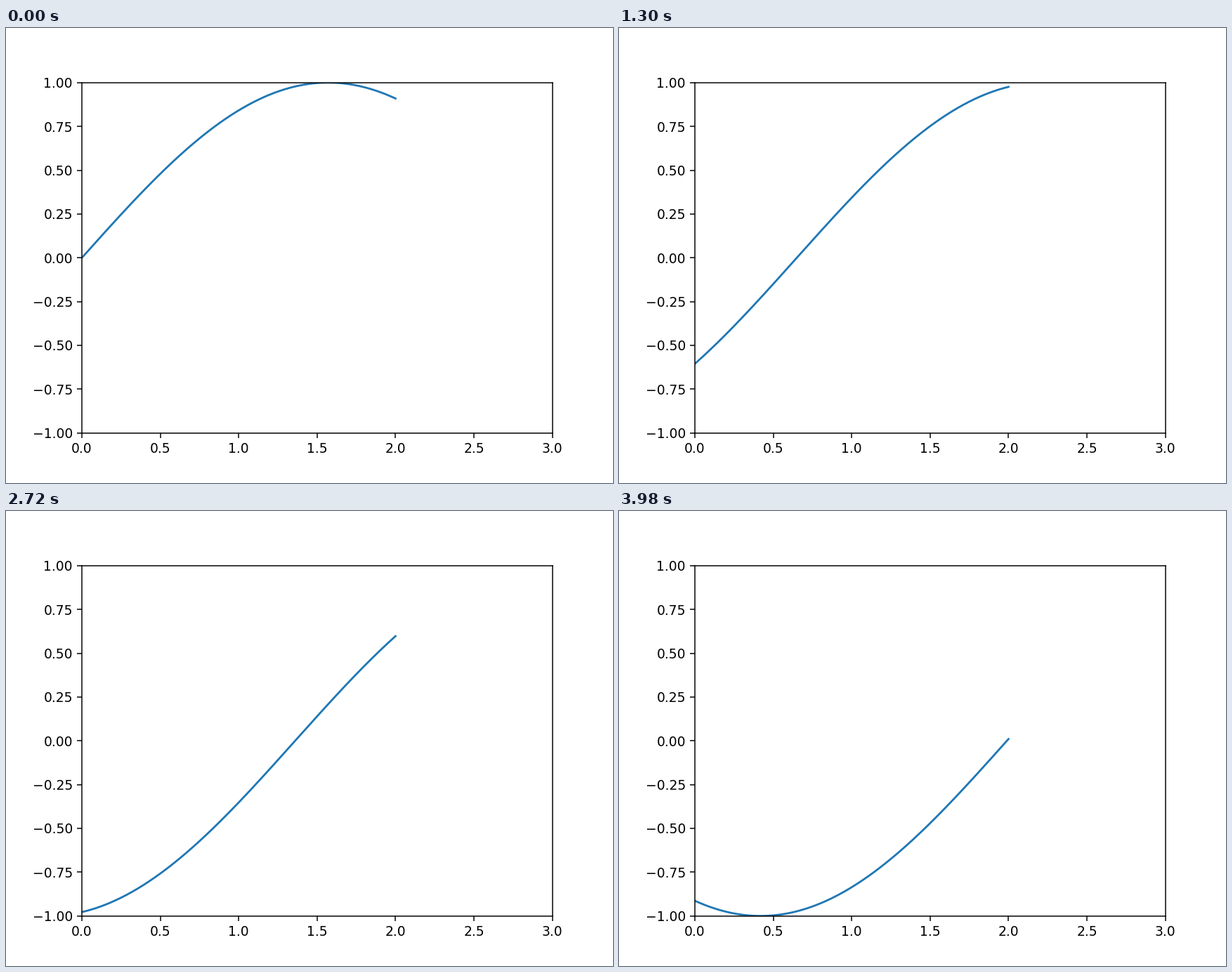
These frames come from a looping animation (864x648 px, 4000 ms). A matplotlib script:

```python
import numpy as np
import matplotlib.pyplot as plt
from matplotlib.animation import FuncAnimation

FRAMES = 200
INTERVAL = 20  # ms
SHIFT = 0.01   # phase shift per frame

fig = plt.figure(figsize=(6.4, 4.8), dpi=135)
ax = fig.add_subplot(xlim=(0, 3), ylim=(-1, 1))
x = np.linspace(0, 2, 1000)
line, = ax.plot(x, np.sin(x), lw=1.5, color="C0")


def update(i):
    line.set_ydata(np.sin(x - SHIFT * i))
    return line,


anim = FuncAnimation(fig, update, frames=FRAMES, interval=INTERVAL,
                     repeat=True, repeat_delay=0, blit=False)
plt.show()
```
